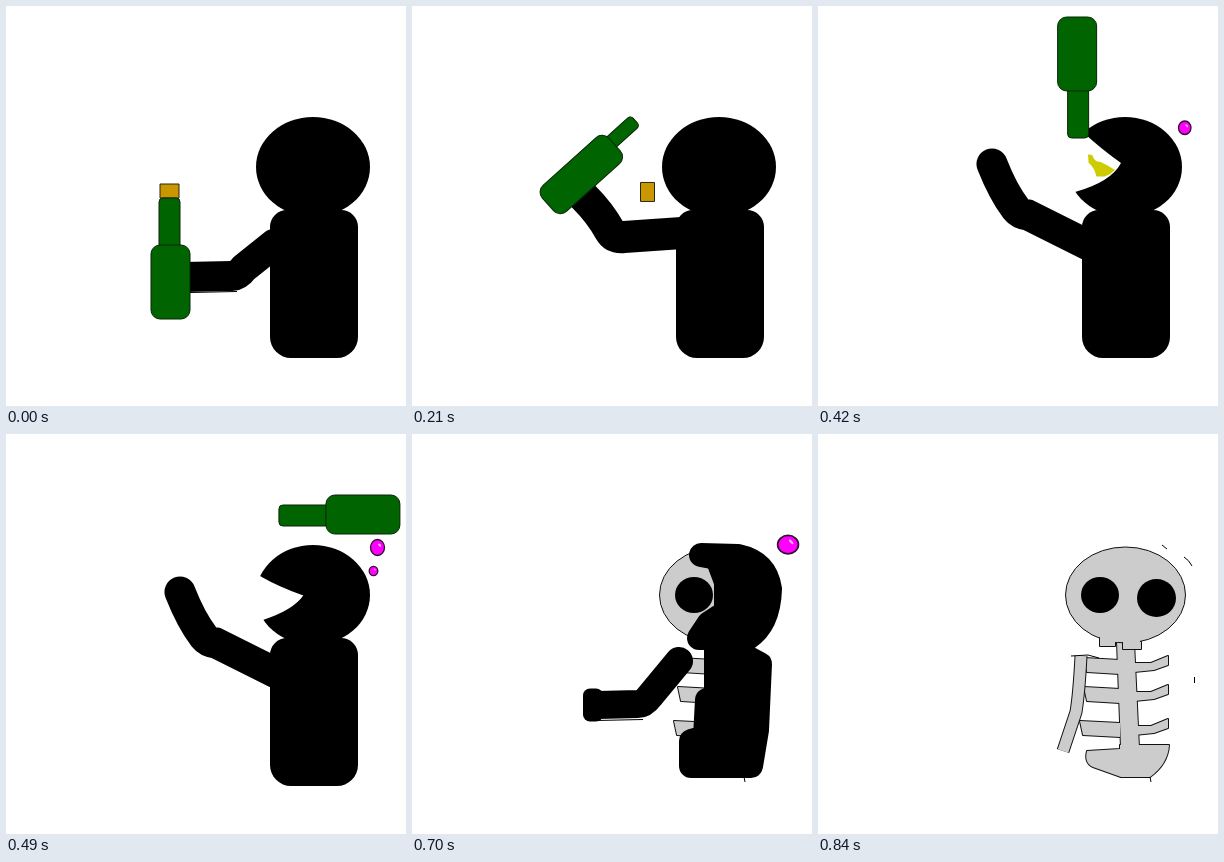
An HTML page with a canvas that plays this animation: 400x400 px, repeating every 0.91 s.

```html
<!DOCTYPE html>
<html>
<head>
<meta charset="utf-8">
<style>
html, body { margin: 0; width: 100%; height: 100%; overflow: hidden; background: #fff; }
canvas { display: block; }
</style>
</head>
<body>
<canvas id="stage" width="400" height="400"></canvas>
<script>
const ctx = document.getElementById('stage').getContext('2d');
const STEP = 70, STEPS = 13;
const BONE = '#ccc', GLASS = '#006400', CORK = '#c99700', INK = '#000';

function paint(fill, edge, width = 1, path) {
  const target = path ? [path] : [];
  ctx.fillStyle = fill;
  ctx.strokeStyle = edge;
  ctx.lineWidth = width;
  if (fill) ctx.fill(...target);
  if (edge) ctx.stroke(...target);
}

function shape(d, fill, edge, width) {
  paint(fill, edge, width, new Path2D(d));
}

function oval(x, y, rx, ry, fill, edge, width) {
  ctx.beginPath();
  ctx.ellipse(x, y, rx, ry, 0, 0, Math.PI * 2);
  paint(fill, edge, width);
}

function box(x, y, w, h, radius, fill, edge) {
  ctx.beginPath();
  ctx.roundRect(x, y, w, h, radius);
  paint(fill, edge);
}

function placed(x, y, degrees, draw) {
  ctx.save();
  ctx.translate(x, y);
  ctx.rotate(degrees * Math.PI / 180);
  draw();
  ctx.restore();
}

// Thick round-ended stroke; also fills the outline when closed
function brush(d, width, fill = null) {
  ctx.lineCap = 'round';
  shape(d, fill, INK, width);
  ctx.lineCap = 'butt';
}

function bottle(x, y, degrees, body = 39, neck = 21, shoulder = -13.5, shift = -1) {
  placed(x, y, degrees, () => {
    box(shift - neck / 2, -60.5, neck, shoulder + 65, 4, GLASS, '#092509');
    box(-body / 2, shoulder, body, 60.5 - shoulder, 9, GLASS, '#092509');
  });
}

function moveBottle(t) {
  if (t < 2) bottle(164.5, 252.5, 0);
  else if (t === 2) bottle(172, 207, 24);
  else if (t === 3) bottle(181, 158, 48, 35, 14, -29, -4);
  else if (t === 4) bottle(181, 147, 69);
  else {
    // Thrown over the head, a quarter turn per step
    const flight = t - 5;
    const x = 180.5 + 80.8 * flight - 2.17 * flight ** 2;
    const y = flight ? 71.5 + 7 * (flight - 1) + 2 * (flight - 1) ** 2 : 138.5;
    bottle(x, y, 90 * (flight + 1));
  }
}

function moveCork(t) {
  const x = 163.5 + 29.4 * t - 1.8 * t * t;
  const y = 185 - 4.87 * t + 1.73 * t * t;
  placed(x, y, Math.min(30 * t, 90), () => box(-9.5, -7, 19, 14, 0, CORK, '#2b2410'));
}

function bubble(x, y, rx, ry) {
  oval(x, y, rx, ry, '#f0f', '#301030', Math.max(1.3, rx * .16));
  placed(x + rx * .3, y - ry * .3, 45, () => oval(0, 0, rx * .28, ry * .13, '#ffb0ff'));
}

function moveBubbles(t) {
  if (t >= 5 && t <= 7) {
    const age = t - 5;
    bubble(362 + 4.75 * age, 130 - 8.25 * age, 5.5 + .75 * age, 5.5 + 1.25 * age);
  }
  if (t >= 7 && t <= 10) {
    const age = t - 7;
    bubble(367.5 + 2.85 * age, 137 - 4.6 * age - 1.4 * age ** 2, 4.3 + .68 * age ** 2, 4.7 + .5 * age ** 2);
  }
  if (t === 8) burst(368, 112);
  if (t === 11) burst(376, 108);
  if (t === 12) shape('M344 111l5 4M366 123q5 3 8 9M376.5 243v6', null, INK);
}

function burst(x, y) {
  for (let i = 0; i < 8; i++) {
    placed(x, y, i * 45 + 12, () => shape('M3 0l5 1', null, '#f4f'));
  }
}

function lowArm(left, shoulder, width) {
  box(left, 254.5, 20, 33, 7, INK);
  brush(`M${left + 15} 271L226 270Q232 270 238 262L${shoulder}`, width);
  shape('M184 286.5L231 285.5', null, INK);
}

function arm(t) {
  if (t < 2 || t > 7) lowArm(163, '268 238', 30);
  else if (t === 2) brush('M174 228L216 252L270 233', 32);
  else if (t === 3) brush('M172 191Q188 207 198 225Q202 232 212 231L270 227', 32);
  else brush('M174 158Q185 186 198 203Q202 208 210 209L270 239', 31);
}

function mouth(open) {
  const lipX = 254 + 12 * open ** 4, lipY = 169 - 42 * open;
  const cornerX = 288 + 15 * open, cornerY = 169 - 12 * open;
  shape(`M240 ${lipY - 16 * open}L${lipX} ${lipY}
    Q${lipX + 16} ${(lipY + cornerY) / 2} ${cornerX} ${cornerY}
    Q${cornerX - 10} 176 257 186L240 192Z`, '#fff');
}

function spill(size) {
  placed(297, 164, 0, () => {
    ctx.scale(size, size);
    shape('M-45-26L-38-25Q-34-13-26-14Q-14-9 0 0Q-8 8-17 11H-31Q-34-4-44-12Z', '#cccc00');
  });
}

function figure(t) {
  arm(t);
  box(264, 204, 88, 148, [17, 17, 21, 21], INK);
  oval(307, 161, 57, 50, INK);
  if (t >= 4) mouth(t < 6 ? (t - 3) / 2 : Math.max(0, 1 - .38 * (t - 6)));
  if (t === 5) spill(1);
  if (t === 6) spill(.6);
}

function ribPair(y, left) {
  return [
    `M${left} ${y}L302 ${y + 2}V${y + 16}L${left + 3} ${y + 14}Z`,
    `M316 ${y + 5}H333L350 ${y - 2}V${y + 7}L336 ${y + 12}L316 ${y + 14}Z`
  ];
}

function skeleton(withArm) {
  const bones = [
    'M299 208H316L321 314H303Z',
    'M269 317L302 315V311H351Q350 330 332 343H303L275 333Q266 329 269 317Z',
    ...ribPair(224, 266), ...ribPair(253, 266), ...ribPair(287, 262)
  ];
  // Outline everything first so that the bones join
  bones.forEach(d => shape(d, null, '#111', 2));
  bones.forEach(d => shape(d, BONE));
  shape('M332 343l1 5', null, INK);
  if (withArm) {
    const armBone = 'M263 222Q261 260 258 278L245 317';
    shape(armBone, null, '#111', 13);
    shape(armBone, null, BONE, 11);
    shape('M253 222L270 221L281 224', null, INK);
  }
  oval(307.5, 161, 60, 48, BONE, '#111');
  box(281.5, 203.5, 16, 9, 0, BONE, '#111');
  box(304.5, 207.5, 19, 8, 0, BONE, '#111');
  ctx.fillStyle = BONE;
  ctx.fillRect(282, 198, 40, 10);
  oval(282, 161, 19, 18, INK);
  oval(338.5, 164, 19.5, 19, INK);
}

function remains(t) {
  if (t === 10) {
    lowArm(171, '267 227', 28);
    brush('M289 121L326 122Q354 128 358 155Q357 190 336 204H287L297 189L314 178V148L305 124Z', 24, INK);
    brush('M304 215V262L295 266L293 303L279 307V332H339L345 296L348 230L320 215Z', 24, INK);
  }
  if (t === 11) {
    brush('M346 130Q366 158 346 192', 24);
    brush('M347 231L345 296L340 331', 22);
  }
}

function draw(t) {
  if (t < 10) {
    if (t < 6) moveCork(t);
    figure(t);
    if (t < 9) moveBottle(t);
  } else {
    skeleton(t > 10);
    remains(t);
  }
  moveBubbles(t);
}

const start = performance.now();
function render() {
  ctx.fillStyle = '#fff';
  ctx.fillRect(0, 0, 400, 400);
  ctx.lineJoin = 'round';
  draw(Math.floor((performance.now() - start) / STEP) % STEPS);
  requestAnimationFrame(render);
}
render();
</script>
</body>
</html>
```
